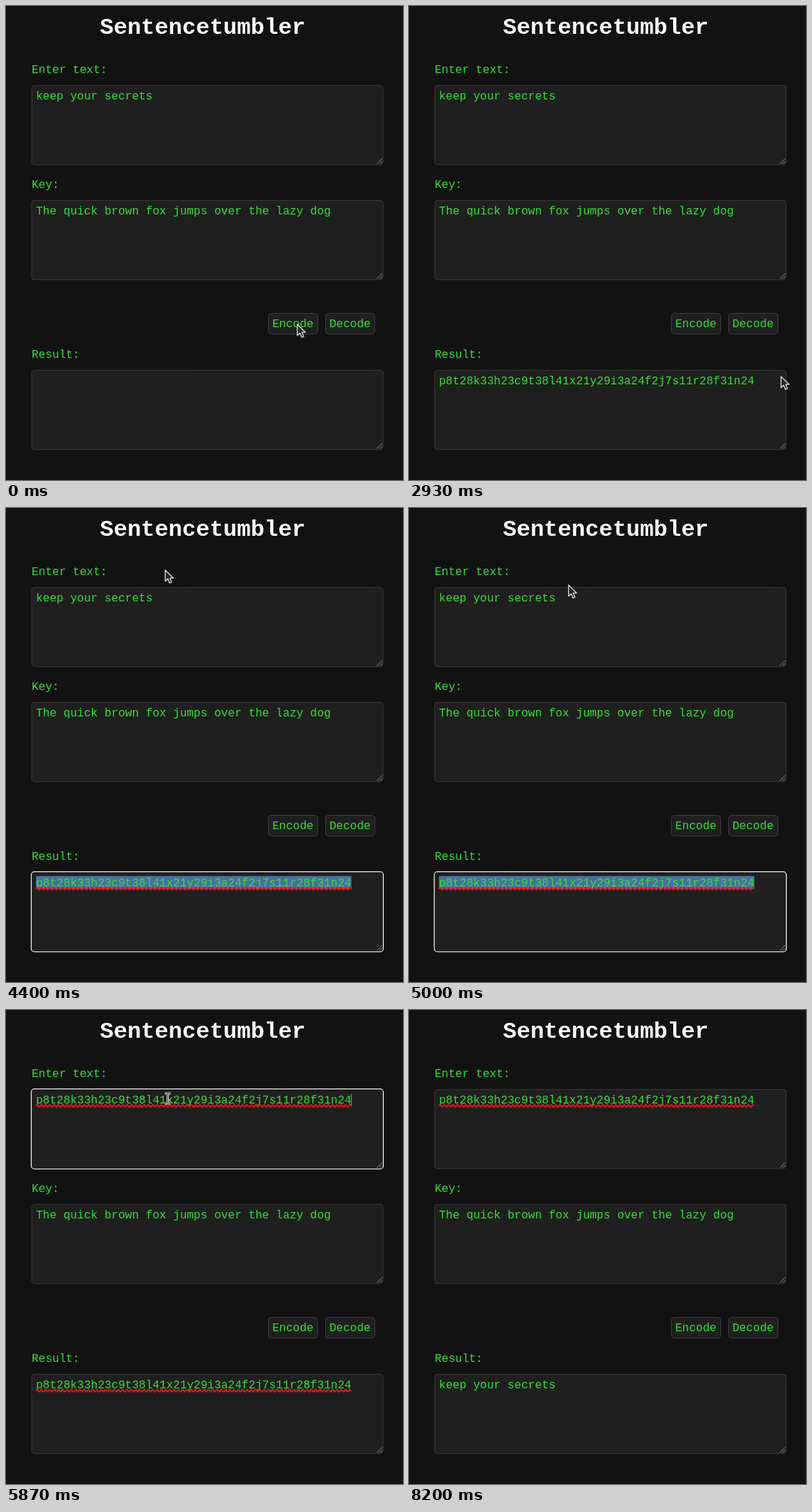
These frames come from a looping animation (556 px wide and 664 px high, 8930 ms). An HTML page:

```html
<!DOCTYPE html>
<html lang="en">
<head>
<meta charset="utf-8">
<style>
html, body { margin: 0; width: 100%; height: 100%; overflow: hidden; background: #121212; }
svg { display: block; width: 556px; height: 664px; }
text { font: 16px "Courier New", "Liberation Mono", monospace; fill: #33e033; white-space: pre; }
.title { font-size: 32px; font-weight: bold; fill: #fff; }
.box { fill: #1f1f1f; stroke: #3b3b3b; }
.ring { fill: none; stroke: #fff; stroke-width: 1.1; }
.grip { stroke: #8c8c8c; stroke-width: 1; }
.mark { fill: #4a70a3; }
.wave { fill: none; stroke: #f01414; stroke-width: 1.9; }
.caret { fill: #33e033; }
.arrow { fill: #262626; stroke: #dedede; stroke-width: 1.3; stroke-linejoin: round; }
.beam path { fill: none; stroke: #e8e8e8; stroke-width: 3; }
.beam path + path { stroke: #222; stroke-width: 1; }
</style>
</head>
<body>
<svg id="stage" viewBox="0 0 556 664"></svg>
<script>
const TICK = 1000 / 15, TICKS = 134, CHAR = 9.602;
const PLAIN = 'keep your secrets';
const CODED = 'p8t28k33h23c9t38l41x21y29i3a24f2j7s11r28f31n24';
const stage = document.getElementById('stage');

const label = (x, y, s, cls = '') => `<text x="${x}" y="${y}" class="${cls}">${s}</text>`;
const rect = (x, y, w, h, r, cls) =>
  `<rect x="${x}" y="${y}" width="${w}" height="${h}" rx="${r}" class="${cls}"/>`;
const button = (x, s) => rect(x + .5, 430.5, 69, 29, 4, 'box') + label(x + 6, 449.6, s);
const wavePath = y => `M42 ${y}` + 'q1.5 -3 3 0t3 0'.repeat(73) + 'q1.5 -3 3 0';

function area(y) {
  return rect(36, y + .3, 492, 111, 4, 'box') +
    `<path class="grip" d="M519.5 ${y + 110}l7.5 -7.5M523.5 ${y + 110}l3.5 -3.5"/>` +
    rect(35.3, y - .5, 493.2, 112.2, 4.5, 'ring') +
    rect(42, y + 5.5, 442, 18, 0, 'mark') +
    label(42, y + 19.6, '', 'value') +
    `<path class="wave" d="${wavePath(y + 23.3)}"/>` +
    rect(0, y + 6.5, 1, 17, 0, 'caret');
}

stage.innerHTML =
  label(131.5, 39, 'Sentencetumbler', 'title') +
  label(36, 93.6, 'Enter text:') + label(36, 254.6, 'Key:') + label(36, 492.6, 'Result:') +
  [111, 272, 510].map(y => `<g class="area">${area(y)}</g>`).join('') +
  button(367, 'Encode') + button(447, 'Decode') +
  '<path class="arrow" d="M0 0V15.6L3.7 12.3L6.2 18.2L9 17L6.6 11.2H11.4Z"/>' +
  '<g class="beam">' +
  '<path d="M-4 -7H-2Q0 -7 0 -5V5Q0 7 -2 7H-4M4 -7H2Q0 -7 0 -5V5Q0 7 2 7H4"/>'.repeat(2) + '</g>';

const areas = [...document.querySelectorAll('.area')];
const pointers = { arrow: stage.querySelector('.arrow'), beam: stage.querySelector('.beam') };

const show = (el, on) => el.setAttribute('visibility', on ? 'visible' : 'hidden');

function setArea(g, { text = '', focus, selected, wavy, caret }) {
  const part = name => g.querySelector('.' + name);
  const end = text.length * CHAR;
  part('value').textContent = text;
  part('mark').setAttribute('width', end);
  part('caret').setAttribute('x', 41.5 + end);
  show(part('ring'), focus);
  show(part('mark'), selected);
  show(part('wave'), wavy);
  show(part('caret'), caret);
}

// Pointer path: tick, x, y, shape (no shape: off stage)
const path = [
  [0, 408, 446, 'arrow'], [25, 408, 446, 'arrow'], [26, 442, 445, 'arrow'],
  [27, 520, 440, 'arrow'], [28, 560, 440],
  [44, 521, 519, 'arrow'], [46, 508, 520, 'beam'], [47, 503, 522, 'beam'],
  [62, 503, 522, 'beam'], [63, 440, 415, 'arrow'], [64, 330, 240, 'arrow'],
  [65, 250, 120, 'arrow'], [66, 223, 87, 'arrow'], [68, 215, 81, 'arrow'],
  [72, 222, 98, 'arrow'], [74, 222, 98, 'arrow'], [76, 225, 118, 'beam'],
  [78, 226.5, 124, 'beam'], [91, 226.5, 124, 'beam'], [94, 400, 270, 'beam'],
  [97, 515, 374, 'beam'], [101, 515, 374, 'beam'],
  [102, 515, 367, 'arrow'], [104, 492, 412, 'arrow'], [106, 473, 443, 'arrow'],
  [121, 473, 443, 'arrow'], [122, 528, 489, 'arrow'], [123, 560, 520], [TICKS, 560, 520]
];

function movePointer(n) {
  const i = path.findIndex(k => k[0] > n) - 1;
  const [t0, x0, y0, shape] = path[i], [t1, x1, y1] = path[i + 1];
  const f = (n - t0) / (t1 - t0);
  for (const name in pointers) {
    show(pointers[name], name === shape);
    pointers[name].setAttribute('transform',
      `translate(${x0 + (x1 - x0) * f} ${y0 + (y1 - y0) * f})`);
  }
}

function draw(ms) {
  const n = Math.floor((ms + 4) / TICK) % TICKS;
  const within = (a, b) => n >= a && n < b;
  const pasted = n >= 88;
  setArea(areas[0], {
    text: pasted ? CODED : PLAIN, wavy: pasted,
    focus: within(77, 95), selected: within(81, 88),
    caret: within(77, 81) || within(88, 95)
  });
  setArea(areas[1], { text: 'The quick brown fox jumps over the lazy dog' });
  setArea(areas[2], {
    text: n < 13 ? '' : n < 110 ? CODED : PLAIN, wavy: within(50, 110),
    focus: within(50, 77), selected: within(51, 77), caret: n === 50
  });
  movePointer(n);
}

const start = performance.now();
function loop() {
  draw((performance.now() - start) % 8930);
  requestAnimationFrame(loop);
}
loop();
</script>
</body>
</html>
```
